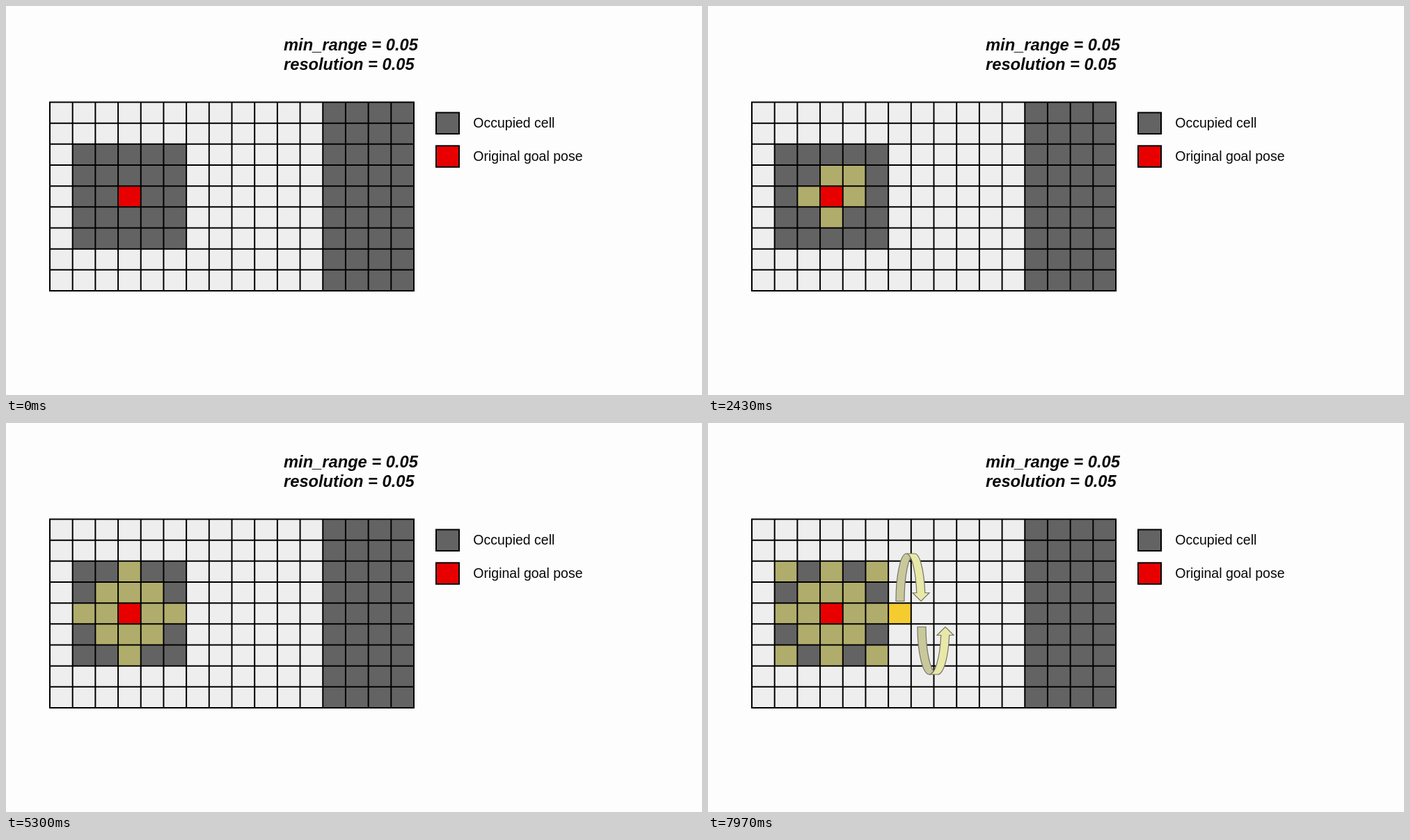
Write an HTML page with a canvas that moves like this. It is 1000 by 560 pixels and loops after 8 s.

```html
<!DOCTYPE html>
<html lang="en">
<head>
<meta charset="utf-8">
<title>Goal pose search</title>
<style>
  html, body { margin: 0; height: 100%; overflow: hidden; background: #fdfdfd; }
  canvas { display: block; }
</style>
</head>
<body>
<canvas id="stage" width="1000" height="560"></canvas>
<script>
const ctx = document.getElementById('stage').getContext('2d');
const LOOP = 8000, FIRST = 850, STEP = 380;
const COLS = 16, ROWS = 9;
const LEFT = 63, TOP = 138.5, CELL_W = 523 / COLS, CELL_H = 271.5 / ROWS;
const GOAL = { col: 3, row: 4 };
const FREE = '#eeeeee', OCCUPIED = '#636363', RED = '#e80000',
      CHECKED = '#b0ad6c', FOUND = '#f5cc30', INK = '#000';

// Each ring is searched along the axes first, then along the diagonals.
const RING = [[1, 0], [-1, 0], [0, -1], [0, 1], [1, -1], [-1, -1], [-1, 1], [1, 1]];
const search = [1, 2].flatMap(r => RING.map(([x, y]) => [x * r, y * r]));

function cells(col, row, cols, rows, color) {
  ctx.fillStyle = color;
  ctx.fillRect(LEFT + col * CELL_W, TOP + row * CELL_H, cols * CELL_W, rows * CELL_H);
}

function gridLines() {
  ctx.beginPath();
  for (let c = 0; c <= COLS; c++) {
    const x = LEFT + c * CELL_W;
    ctx.moveTo(x, TOP - 1);
    ctx.lineTo(x, TOP + ROWS * CELL_H + 1);
  }
  for (let r = 0; r <= ROWS; r++) {
    const y = TOP + r * CELL_H;
    ctx.moveTo(LEFT - 1, y);
    ctx.lineTo(LEFT + COLS * CELL_W + 1, y);
  }
  ctx.strokeStyle = INK;
  ctx.lineWidth = 2;
  ctx.stroke();
}

function text(string, x, y, font) {
  ctx.font = font + ' "Liberation Sans", Arial, sans-serif';
  ctx.fillStyle = '#080808';
  ctx.fillText(string, x, y);
}

function legend(y, color, label) {
  ctx.fillStyle = color;
  ctx.fillRect(618, y, 33, 30.5);
  ctx.strokeStyle = INK;
  ctx.lineWidth = 2;
  ctx.strokeRect(618, y, 33, 30.5);
  text(label, 671.3, y + 21.7, '19.5px');
}

// Curved arrow standing on (x, y); a negative h makes it hang below.
function arrow(x, y, w, h) {
  const band = 12, head = 24, rx = w / 2 - 9;
  const s = Math.sign(h), top = y - h, neck = y - s * 12;
  const reach = rx * Math.sqrt(1 - (12 / h) ** 2);
  const joinY = y - h * Math.sqrt(1 - (band / 2 / rx) ** 2);
  const joinX = x + rx + band / 2;
  const arc = (sweep, px, py) => `A${rx} ${Math.abs(h)} 0 0 ${s > 0 ? sweep : 1 - sweep} ${px} ${py}`;
  const tail = `M${x} ${y}` + arc(1, x + rx, top) + arc(1, joinX, joinY) +
    arc(0, x + band, y) + 'Z';
  const front = `M${x + rx} ${top}H${x + rx + band}` + arc(1, x + rx + band + reach, neck) +
    `H${x + w}L${x + w - head / 2} ${y}L${x + w - head} ${neck}H${x + rx + reach}` +
    arc(0, x + rx, top) + 'Z';
  ctx.lineWidth = 1.2;
  ctx.strokeStyle = '#757568';
  for (const [path, color] of [[tail, '#c8c89b'], [front, '#e8e8a8']]) {
    const shape = new Path2D(path);
    ctx.fillStyle = color;
    ctx.fill(shape);
    ctx.stroke(shape);
  }
}

function draw(t) {
  const step = Math.floor((t - FIRST) / STEP) + 1;
  ctx.fillStyle = '#fdfdfd';
  ctx.fillRect(0, 0, 1000, 560);

  cells(0, 0, COLS, ROWS, FREE);
  cells(12, 0, 4, ROWS, OCCUPIED);
  cells(1, 2, 5, 5, OCCUPIED);
  search.slice(0, Math.max(0, step))
    .forEach(([x, y]) => cells(GOAL.col + x, GOAL.row + y, 1, 1, CHECKED));
  cells(GOAL.col, GOAL.row, 1, 1, RED);
  if (step > 16) cells(GOAL.col + 3, GOAL.row, 1, 1, FOUND);
  gridLines();

  text('min_range = 0.05', 399, 63.5, 'italic bold 23.7px');
  text('resolution = 0.05', 399, 92.3, 'italic bold 23.7px');
  legend(153.5, OCCUPIED, 'Occupied cell');
  legend(201.3, RED, 'Original goal pose');

  if (step > 17) arrow(270, 256.5, 48, 68.5);
  if (step > 18) arrow(301, 293.5, 52, -68.5);
}

function frame() {
  draw(performance.now() % LOOP);
  requestAnimationFrame(frame);
}
frame();
</script>
</body>
</html>
```
